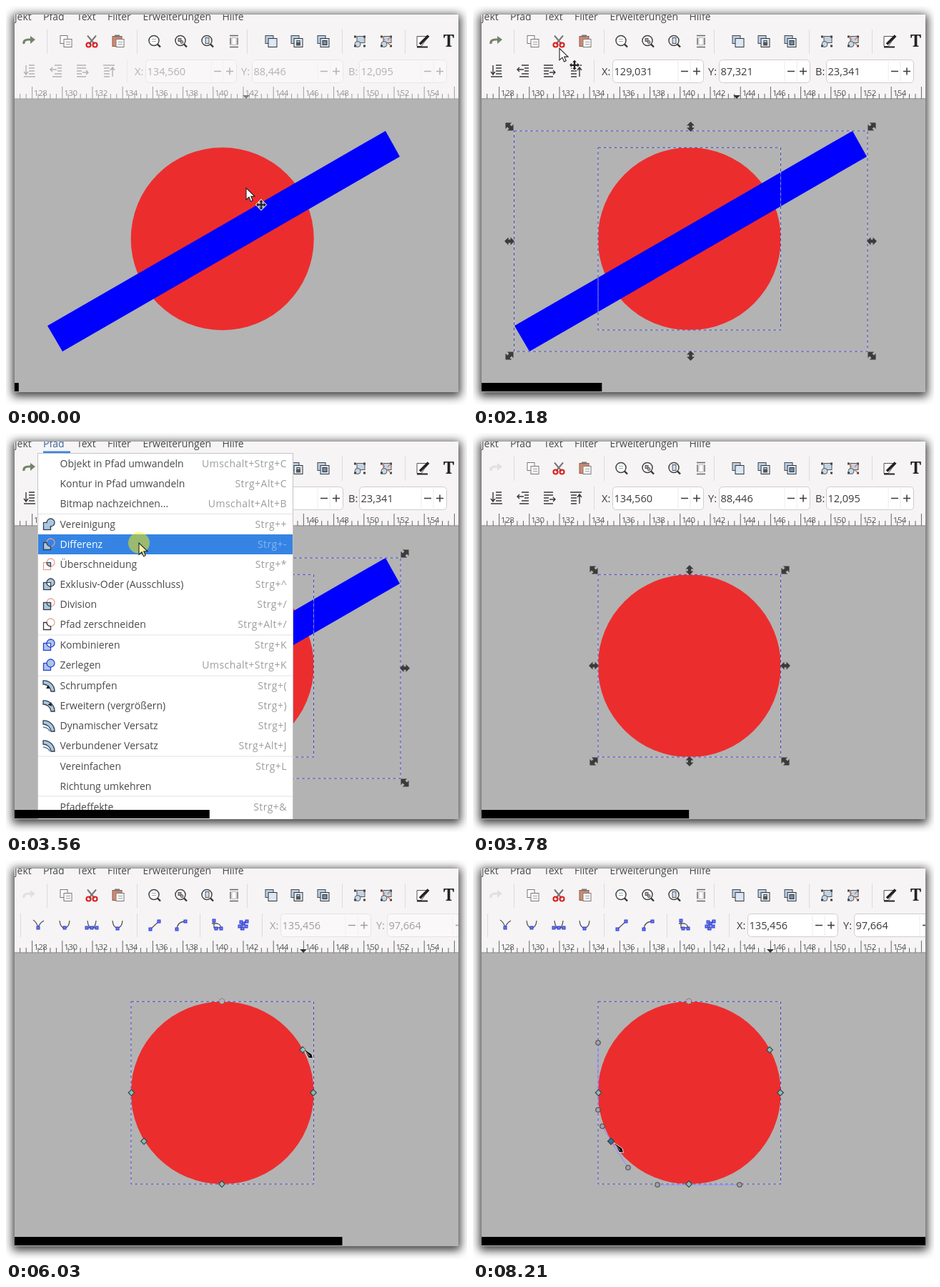
These frames come from a looping animation (645x559 px, 8.29 s). An HTML page:

```html
<!DOCTYPE html>
<html lang="de">
<head>
<meta charset="utf-8">
<title>Pfad-Differenz</title>
<style>
html, body { margin: 0; width: 100%; height: 100%; overflow: hidden; background: #fff; }
#shadow { position: absolute; left: 12px; top: 12px; width: 621px; height: 529px; box-shadow: 0 3px 12px 3px rgba(0,0,0,.75); }
svg { position: absolute; left: 0; top: 0; }
text { font: 14px "Open Sans", "Noto Sans", sans-serif; fill: #4a4a4a; }
.num text { font-size: 14.6px; fill: #3a3a3a; }
.key { fill: #9c9c9c; letter-spacing: .45px; text-anchor: end; }
.on text { fill: #fff; }
.on .key { fill: #86b6f2; }
.tick { font-size: 11.5px; letter-spacing: -.5px; fill: #555; }
.active { fill: #3c64a0; }
.hide { display: none; }
</style>
</head>
<body>
<div id="shadow"></div>
<svg id="stage" width="645" height="559" viewBox="0 0 645 559"></svg>
<script>
const LOOP = 8290, STEPS = 107, STEP = LOOP / STEPS;
const CX = 302.7, CY = 326.2, R = 128;

// Markup helpers
const path = (d, fill = 'none', stroke = 'none', w = 1, more = '') =>
  `<path d="${d}" fill="${fill}" stroke="${stroke}" stroke-width="${w}" ${more}/>`;
const line = (d, color = '#3a3a3a', w = 1.4) => path(d, 'none', color, w);
const rect = (x, y, w, h, fill = 'none', stroke = 'none', more = '') =>
  `<rect x="${x}" y="${y}" width="${w}" height="${h}" fill="${fill}" stroke="${stroke}" ${more}/>`;
const circle = (x, y, r, fill = 'none', stroke = 'none', more = '') =>
  `<circle cx="${x}" cy="${y}" r="${r}" fill="${fill}" stroke="${stroke}" ${more}/>`;
const text = (x, y, s, more = '') => `<text x="${x}" y="${y}" ${more}>${s}</text>`;
const group = (id, body, more = '') => `<g id="${id}" ${more}>${body}</g>`;
const at = (x, y, body) => `<g transform="translate(${x} ${y})">${body}</g>`;
const bars = (y1, y2, xs) => line(xs.map(x => `M${x} ${y1}V${y2}`).join(''), '#dcdadb', 1);

function menuBar() {
  const words = [[12, 'jekt'], [52, 'Pfad'], [99, 'Text'], [142, 'Filter'], [191.5, 'Erweiterungen'], [302.5, 'Hilfe']];
  return words.map(([x, s]) => text(x, 20.3, s, `id="word${s}"`)).join('');
}

function mainTools() {
  const lens = inner => circle(-1, -1, 7, '#fff', '#444', 'stroke-width="1.5"') + line('M4 4L8 8', '#333', 2.4) + inner;
  const pair = inner => rect(-8, -8, 11, 11, '#b9d0ea', '#444') + rect(-4, -4, 12, 12, '#dbe7f4', '#333') + inner;
  const lock = rect(-1, 1, 6, 5, '#555') + line('M0 1V-1H4V1', '#444', 1.2);
  const grouped = (a, b) => rect(-4, -7, 11, 9, '#c3d3e2', '#555') + circle(-3, 4, 4, '#c5d8ea', '#555') +
    [[-8, -8], [5, -8], [-8, 5], [5, 5]].map(([x, y]) => rect(x, y, 3, 3, a)).join('') + b;
  const icons = [
    [84, rect(-8, -8, 10, 11, '#fff', '#777') + rect(-3, -3, 11, 11, '#fff', '#777') + line('M0 1H6M0 4H6', '#999', 1)],
    [120, line('M-6 -8L4 4M6 -8L-4 4', '#777', 2) + circle(-4.5, 5, 3, 'none', '#d22', 'stroke-width="2.2"') + circle(4.5, 5, 3, 'none', '#d22', 'stroke-width="2.2"')],
    [157, rect(-8, -7, 13, 14, '#d08a70', '#8a5a48') + rect(-5, -9, 7, 3, '#777') + rect(-3, -3, 11, 11, '#fff', '#777') + line('M0 1H6M0 4H6', '#999', 1)],
    [208, lens(line('M-4 -3H2M-4 0H2', '#9ab', 1))],
    [245, lens(rect(-4, -4, 4, 4, '#a9c', '#555') + circle(1, 1, 2, '#9b8', '#555'))],
    [282, lens(rect(-3, -5, 5, 8, '#cde', '#555'))],
    [319, line('M-6 -8H6M-6 8H6M-5 -5V5M5 -5V5', '#666') + rect(-3, -5, 6, 10, '#fff', '#bbb')],
    [371, pair('')],
    [407, pair(lock)],
    [444, pair(rect(-1, -1, 6, 6, '#6f8caa', '#333'))],
    [495, grouped('#444', '')],
    [532, grouped('#444', line('M-6 -6L-2 -2M2 2L6 6M6 -6L2 -2', '#d97a5a', 1.3))],
    [583, path('M-8 -7H9L3 0L-2 7H-8Z', '#fff', '#555') + line('M8 -8L-4 4', '#222', 3.5) + line('M-8 8H7', '#222', 2)]
  ];
  const redo = line('M-7 4Q-8 -2 0 -2H4', '#74836a', 3.2) + path('M2 -7L9 -2L2 4Z', '#74836a');
  return bars(33, 67, [57.5, 183.5, 337.5, 470.5, 558.5]) + group('redo', at(32, 49, redo)) +
    icons.map(([x, body]) => at(x, 49.5, body)).join('') +
    text(612, 57, 'T', 'style="font:bold 23px \'Noto Serif\',serif;fill:#222"');
}

function field(label, x, id, w = 127) {
  return text(x - 15, 97, label) + rect(x + .5, 75.5, w, 32, '#fff', '#cfcdce', 'rx="5"') +
    line(`M${x + w - 35} 77V106M${x + w - 18} 77V106`, '#ececec', 1) +
    text(x + 2.5, 97, '', `id="${id}"`) +
    line(`M${x + w - 31} 91.5h10M${x + w - 14} 91.5h10m-5 -5v10`, '#3a3a3a', 1.5);
}

function selectRow() {
  const icons = [
    [33, 'M-8 8H8M-1 -8H7M-1 -4H7M-1 0H7M-1 4H7M-5 -8V4M-8 1L-5 5L-2 1'],
    [70, 'M-2 -8H8M2 -4H8M2 0H8M-2 4H8M-5 8H8M1 -2H-8M-5 -5L-8 -2L-5 1'],
    [107, 'M-8 -8H5M-8 -4H5M-8 0H-1M-8 4H-1M-8 8H5M0 2H8M5 -1L8 2L5 5'],
    [144, 'M-8 -8H8M-7 -4H1M-7 0H1M-7 4H1M-7 8H1M5 8V-4M2 -1L5 -5L8 -1']
  ];
  return icons.map(([x, d]) => at(x, 91, line(d))).join('') + bars(75, 108, [169.5]) +
    field('X:', 195, 'sx') + field('Y:', 344, 'sy') + field('B:', 494, 'sw', 122);
}

function nodeRow() {
  const icons = [
    [45, 'M-7 -7Q-2 -4 0 4Q2 -3 8 -6', [[0, 4]]],
    [82, 'M-7 -6Q-6 4 0 4Q6 4 7 -6', [[0, 4]]],
    [120, 'M-6 -6Q-5 4 0 4Q5 4 6 -6M-7 4H7', [[0, 4], [-7, 4], [7, 4]]],
    [156, 'M-7 -6Q-6 4 0 4Q6 4 7 -6', [[0, 5]]],
    [208, 'M-6 6L6 -5', [[-6, 6], [6, -5]]],
    [245, 'M-6 6Q-5 -5 6 -5', [[-6, 6], [6, -5]]],
    [295, 'M-4 -6V4H6M-7 -2H1Q6 0 6 5', [[-4, -6], [6, 5], [-1, 5]]],
    [332, 'M-7 3L6 -5M-4 7L4 -7', [[-5, 2], [-1, 5], [0, -2], [5, -5], [4, 2], [-3, -4]]]
  ];
  const squares = pts => pts.map(([x, y]) => rect(x - 2, y - 2, 4, 4, '#6a7cff', '#2a3bd0')).join('');
  return icons.map(([x, d, pts]) => at(x, 91, line(d, '#555', 1.3) + squares(pts))).join('') +
    bars(75, 108, [20.5, 183.5, 271.5, 358.5]) +
    group('nodeFields', field('X:', 384, 'nx', 126) + field('Y:', 533, 'ny'));
}

function ruler() {
  let out = '';
  for (let i = -6; i < 72; i++) {
    const x = (36.6 + i * 8.44).toFixed(1), major = i % 5 === 0;
    out += line(`M${x} ${major ? 113 : 123}V130`, '#666', 1);
    if (major && i >= 0 && i < 70) out += text(+x + 2.5, 125.5, 128 + i / 5 * 2, 'class="tick"');
  }
  return out + line('M12 129.8H633', '#777', .8);
}

const dashBox = (x, y, w, h) => rect(x, y, w, h, 'none', '#d5d5ee', 'stroke-opacity=".7"') +
  rect(x, y, w, h, 'none', '#4646b4', 'stroke-dasharray="4 3.5"');

function arrows(x0, y0, x1, y1) {
  const mx = (x0 + x1) / 2, my = (y0 + y1) / 2;
  const spots = [[x0, y0, -45], [mx, y0, 0], [x1, y0, 45], [x0, my, 90], [x1, my, 90], [x0, y1, 45], [mx, y1, 0], [x1, y1, -45]];
  return spots.map(([x, y, a]) => path('M0 -7L5.5 -1.5H2.2V1.5H5.5L0 7L-5.5 1.5H-2.2V-1.5H-5.5Z', '#3b3b3b', 'none', 1,
    `transform="translate(${x} ${y}) rotate(${a}) scale(${a % 90 ? 1.12 : 1})"`)).join('');
}

const diamond = (x, y, fill = '#86bdbd') => path(`M${x} ${y - 4.3}l4.3 4.3l-4.3 4.3l-4.3 -4.3Z`, fill, '#454545', 1.2);

// Bezier handles of one chosen node and its neighbours; the other node uses the mirrored set
function knobs(flip) {
  const f = ([x, y]) => flip ? [605 - x, 652 - y] : [x, y];
  const pairs = [[[175, 256], [175, 350]], [[181, 373], [217, 431]], [[258, 455], [373, 455]]];
  const mids = [[175, 326], [193, 394], [302, 455]];
  return pairs.map(([a, b], i) => {
    const [p, m, q] = [f(a), f(mids[i]), f(b)];
    return line(`M${p}L${m}L${q}`, '#8f8fff', 1.1) +
      [p, q].map(([x, y]) => circle(x, y, 3.2, '#a2a2a8', '#4c4c4c', 'stroke-width="1.1"')).join('');
  }).join('');
}

function nodes() {
  return [[175.5, 326], [193, 394], [302, 454], [430, 326], [415, 266]].map(([x, y]) => diamond(x, y)).join('') +
    circle(302, 198, 3.8, '#bcb0b0', '#555', 'stroke-dasharray="2 1.4"');
}

// Menu entries: centre line, label, shortcut, icon kind
const ROWS = [
  [43, 'Objekt in Pfad umwandeln', 'Umschalt+Strg+C'], [71, 'Kontur in Pfad umwandeln', 'Strg+Alt+C'],
  [99, 'Bitmap nachzeichnen...', 'Umschalt+Alt+B'],
  [128, 'Vereinigung', 'Strg++', 'union'], [156, 'Differenz', 'Strg+-', 'diff'],
  [184, 'Überschneidung', 'Strg+*', 'cross'], [212, 'Exklusiv-Oder (Ausschluss)', 'Strg+^', 'xor'],
  [240, 'Division', 'Strg+/', 'divide'], [268, 'Pfad zerschneiden', 'Strg+Alt+/', 'cut'],
  [297, 'Kombinieren', 'Strg+K', 'join'], [325, 'Zerlegen', 'Umschalt+Strg+K', 'split'],
  [354, 'Schrumpfen', 'Strg+(', 'arcIn'], [382, 'Erweitern (vergrößern)', 'Strg+)', 'arcOut'],
  [410, 'Dynamischer Versatz', 'Strg+J', 'arc'], [438, 'Verbundener Versatz', 'Strg+Alt+J', 'arc'],
  [467, 'Vereinfachen', 'Strg+L'], [495, 'Richtung umkehren', ''], [523.5, 'Pfadeffekte', 'Strg+&amp;']
];

function menuIcon(kind) {
  const blue = '#a9c7e2', dark = '#343c48', ink = '#2f3fe0', red = '#e8a090';
  const sq = (f, s) => rect(-7.5, -2.5, 10, 10, f, s, 'stroke-width="1.3"');
  const ci = (f, s) => circle(2.5, -2.5, 5.5, f, s, 'stroke-width="1.3"');
  const lens = (f, s) => path('M-3 -2.5H2.5V3A5.5 5.5 0 0 1 -3 -2.5Z', f, s, 1.2);
  const bite = f => path('M-7.5 -2.5H-3A5.5 5.5 0 0 0 2.5 3V7.5H-7.5Z', f, dark, 1.3);
  const arc = path('M-8 -7A15 15 0 0 1 8 8H3A11 11 0 0 0 -8 -2Z', blue, dark, 1.3);
  const tip = '<path d="M0 0H-6L-3 -5Z" fill="#222" transform="';
  return {
    union: () => sq(blue, dark) + ci(blue, dark) + path('M-6.8 -1.8H1.8V3H-6.8Z', blue),
    diff: () => ci('none', red) + bite(blue),
    cross: () => sq('none', red) + ci('none', red) + lens(blue, dark),
    xor: () => sq(blue, dark) + ci(blue, dark) + lens('#fff', dark),
    divide: () => ci('none', red) + sq(blue, dark) + lens('none', dark),
    cut: () => ci('none', red) + bite('none'),
    join: () => sq(blue, ink) + ci(blue, ink) + lens('#fff', ink),
    split: () => sq(blue, ink) + ci(blue, ink),
    arc: () => arc + line('M-8 2Q0 3 1 8', '#5c7ea0', 1.6),
    arcIn: () => arc + tip + 'translate(2 4)"/>',
    arcOut: () => arc + tip + 'translate(4 1) rotate(25)"/>'
  }[kind]();
}

function menu() {
  const rows = ROWS.map(([y, label, key, icon]) =>
    `<g class="row">${rect(45, y - 14, 356, 28, '#3584e4', 'none', 'class="hide"')}${icon ? at(60, y, menuIcon(icon)) : ''}` +
    text(75.5, y + 5.2, label) + text(393, y + 5.2, key, 'class="key"') + '</g>').join('');
  return rect(52, 25.5, 38, 2.5, '#3584e4') + rect(44.5, 28.5, 357, 520, '#fff', '#c4c4c4') +
    line([113.5, 283, 340, 453, 509].map(y => `M45 ${y}H401`).join(''), '#e2e2e2', 1) + rows;
}

function pointer() {
  const cross = 'M0 -7L3 -4H1.2V-1.2H4V-3L7 0L4 3V1.2H1.2V4H3L0 7L-3 4H-1.2V1.2H-4V3L-7 0L-4 -3V-1.2H-1.2V-4H-3Z';
  return group('arrow', path('M0 0V16.5L4 12.8L6.5 18.7L9.2 17.5L6.8 11.8H12Z', '#fff', '#222', 1.1, 'id="arrowShape"') +
    group('moveSign', path(cross, '#222', '#fff', 1.6, 'transform="translate(21 23.5)" paint-order="stroke"'))) +
    group('pen', path('M0 0L12 8L13.5 14L7.5 13.5Z', '#0c0c0c', '#eee', .9) + line('M3 4L9 11', '#ddd', .8));
}

const stage = document.getElementById('stage');
stage.innerHTML = '<clipPath id="win"><rect x="12" y="12" width="621" height="529"/></clipPath><g clip-path="url(#win)">' +
  rect(12, 12, 621, 118, '#f6f4f5') + rect(12, 130, 621, 411, '#b3b3b3') +
  menuBar() + mainTools() + group('selectRow', selectRow(), 'class="num"') + group('nodeRow', nodeRow(), 'class="num"') +
  group('ruler', ruler()) + path('M-5 125H5L0 130Z', '#333', 'none', 1, 'id="marker"') +
  circle(CX, CY, R, '#ec2d2e') + path('M58 448L531 175L551 211L79 484Z', '#00f', 'none', 1, 'id="bar"') +
  group('circleBox', dashBox(175, 198.3, 255.5, 255.7)) + group('bothBox', dashBox(57.5, 175, 494.5, 309)) +
  group('circleArrows', arrows(169, 192, 437, 460)) + group('bothArrows', arrows(51, 169, 558, 490)) +
  group('knobsA', knobs(true)) + group('knobsB', knobs(false)) + group('nodes', nodes()) +
  group('pickA', diamond(415, 266, '#2f74a8')) + group('pickB', diamond(193, 394, '#2f74a8')) +
  group('menu', menu()) + circle(0, 0, 15, '#fff000', 'none', 'id="glow" opacity=".5"') + pointer() +
  rect(12, 528, 0, 12, '#000', 'none', 'id="progress"') + '</g>';

const $ = id => document.getElementById(id);
const show = (id, on) => $(id).classList.toggle('hide', !on);
const place = (id, x, y) => $(id).setAttribute('transform', `translate(${x} ${y})`);
const rows = [...document.querySelectorAll('.row')];

// Pointer tracks: step, x, y
const ARROW = [[0, 336, 255], [6, 336, 255], [9, 369, 291], [12, 369, 291], [16, 289, 247], [22, 195, 146],
  [31, 84, 16], [35, 84, 16], [43, 186, 154]];
const PEN = [[67, 313, 290], [76, 416, 264], [80, 416, 264], [89.5, 193, 394], [94, 193, 394],
  [99, 202, 402], [106, 197, 396]];
const linear = k => k, smooth = k => k * k * (3 - 2 * k);
function track(keys, n, ease) {
  let i = 0;
  while (i < keys.length - 2 && n > keys[i + 1][0]) i++;
  const [a, x, y] = keys[i], [b, u, v] = keys[i + 1];
  const k = ease(Math.min(1, Math.max(0, (n - a) / (b - a))));
  return [x + (u - x) * k, y + (v - y) * k];
}
const arrowAt = n => track(ARROW, n, linear);
const penAt = n => track(PEN, n, smooth);

// Steps at which the state changes; each press glows for PRESS steps
const PICK_ONE = 6, PICK_TWO = 11, OPEN = 32, DONE = 48, NODE_TOOL = 64, PEN_IN = 67, NODE_A = 80, NODE_B = 92;
const CLICKS = [4, 9, 32, 45, 79, 91], PRESS = 3;

function draw(n) {
  const both = n >= PICK_TWO && n < DONE, open = n >= OPEN && n < DONE;
  const nodeTool = n >= NODE_TOOL, result = n >= DONE, early = !result;
  const arrow = arrowAt(n), pen = penAt(n);

  $('ruler').setAttribute('opacity', n ? 1 : .6);
  $('redo').setAttribute('opacity', result ? .16 : 1);
  show('selectRow', !nodeTool);
  $('selectRow').setAttribute('opacity', n < PICK_ONE ? .35 : 1);
  $('sx').textContent = both ? '129,031' : '134,560';
  $('sy').textContent = both ? '87,321' : '88,446';
  $('sw').textContent = both ? '23,341' : '12,095';
  show('nodeRow', nodeTool);
  $('nodeFields').setAttribute('opacity', n < NODE_A ? .45 : 1);
  const onA = n >= NODE_A && n < NODE_B, onB = n >= NODE_B;
  $('nx').textContent = onA ? '145,934' : '135,456';
  $('ny').textContent = onA ? '91,669' : '97,664';

  show('marker', early || n >= PEN_IN);
  $('marker').setAttribute('opacity', n ? 1 : .6);
  place('marker', early ? arrowAt(Math.min(n, PICK_TWO))[0] : penAt(Math.min(n, NODE_A))[0], 0);

  show('bar', early);
  show('circleBox', n >= PICK_ONE);
  show('bothBox', both);
  show('circleArrows', (n >= PICK_ONE && n < PICK_TWO) || (result && !nodeTool));
  show('bothArrows', both && n > PICK_TWO);
  show('nodes', nodeTool);
  show('knobsA', onA);
  show('pickA', onA);
  show('knobsB', onB);
  show('pickB', onB);

  show('menu', open);
  $('wordPfad').classList.toggle('active', open);
  rows.forEach((row, i) => {
    const on = open && arrow[1] > 29 && Math.abs(arrow[1] - ROWS[i][0]) <= 14;
    row.classList.toggle('on', on);
    row.firstChild.classList.toggle('hide', !on);
  });

  const glow = CLICKS.some(c => n >= c && n < c + PRESS);
  show('glow', glow);
  place('glow', ...(early ? arrow : pen));
  $('arrowShape').setAttribute('fill', glow ? '#fbf7a6' : '#fff');
  show('arrow', early);
  place('arrow', ...arrow);
  show('moveSign', n < 36);
  show('pen', n >= PEN_IN);
  place('pen', ...pen);
  $('progress').setAttribute('width', (n + 1) * 621 / STEPS);
}

const start = performance.now();
let last = -1;
function tick() {
  const t = (performance.now() - start) % LOOP;
  const n = Math.min(STEPS - 1, Math.floor(t / STEP + .2));
  if (n !== last) draw(last = n);
  requestAnimationFrame(tick);
}
tick();
</script>
</body>
</html>
```
